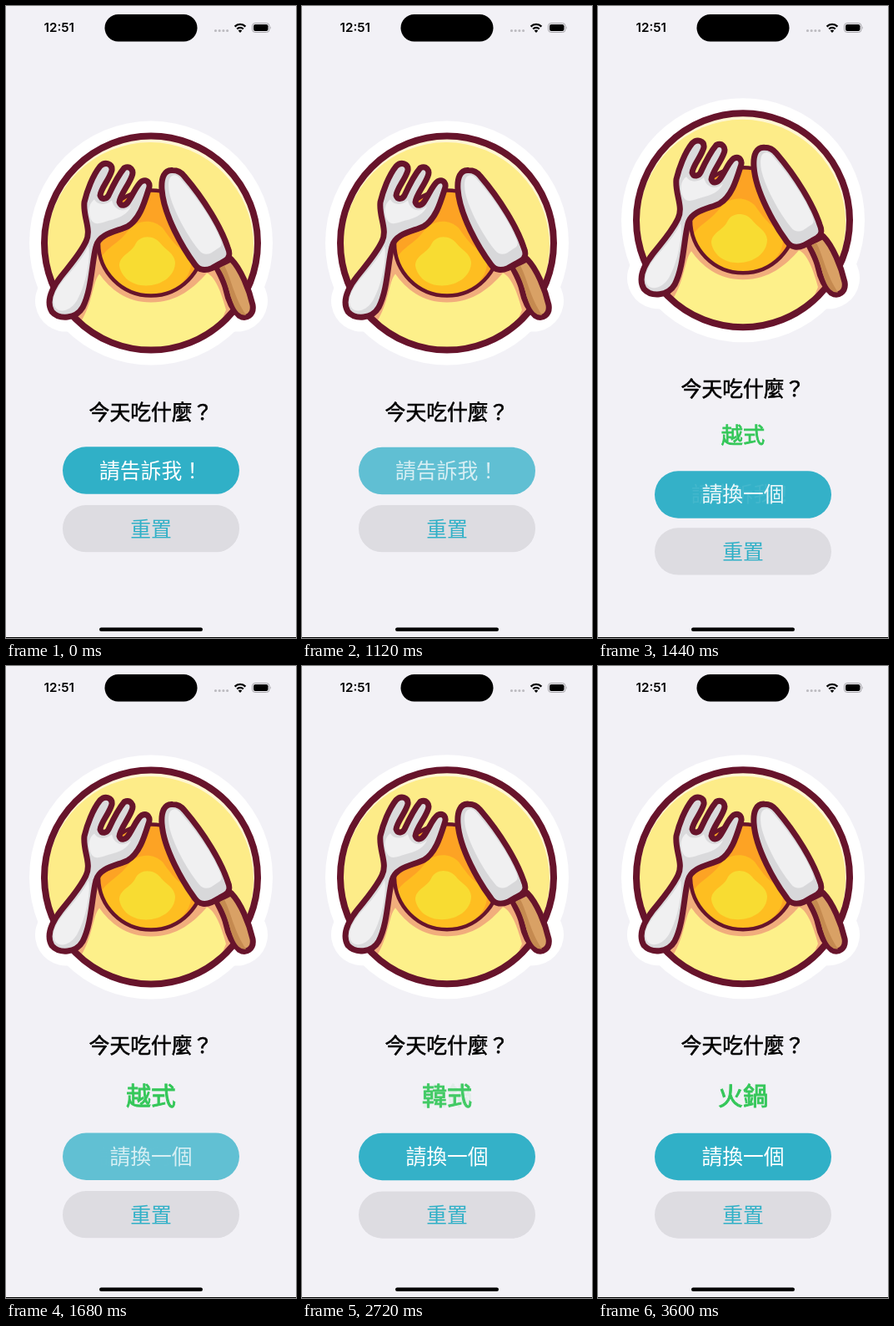
Animation of 348 by 756 pixels, one loop 4400 ms. Source, as an HTML page:

```html
<!DOCTYPE html>
<html lang="zh-TW">
<head>
<meta charset="utf-8">
<title>今天吃什麼？</title>
<style>
html, body { margin: 0; width: 100%; height: 100%; overflow: hidden; background: #f2f1f6; }
svg { display: block; }
text { font: 24.8px "Noto Sans CJK TC", "Noto Sans CJK", sans-serif; text-anchor: middle; }
.title { stroke: #000; stroke-width: .6; }
.food { font-size: 30.1px; fill: #34c759; stroke: #34c759; stroke-width: 1; }
.clock { font: 600 15.2px Inter, sans-serif; }
.line { stroke: #67142b; stroke-width: 7; stroke-linejoin: round; }
</style>
</head>
<body>
<svg width="348" height="756" viewBox="0 0 348 756">
  <clipPath id="plate"><circle cx="174" cy="284" r="127"/></clipPath>
  <clipPath id="yolk"><circle cx="174" cy="284" r="62"/></clipPath>

  <g id="status">
    <text class="clock" x="63.800" y="31.300">12:51</text>
    <rect x="118.5" y="10" width="111" height="32.5" rx="16.2"/>
    <path d="M251.5 29.5h15" stroke="#bcbbc0" stroke-width="3.2" stroke-linecap="round" stroke-dasharray="0 4.7"/>
    <path d="M274.6 24.6a9 9 0 0 1 12.8 0M277.2 27.5a5.4 5.4 0 0 1 7.6 0" fill="none" stroke="#000" stroke-width="2.3"/>
    <path d="M281 32l-2.3-2.4a3.2 3.2 0 0 1 4.6 0z"/>
    <rect x="295.5" y="20.5" width="20.5" height="11" rx="3.4" fill="none" stroke="#a4a3a8"/>
    <rect x="297" y="22" width="17.5" height="8" rx="2.2"/>
    <path d="M317.3 24.2q1.6 1.8 0 3.6z" fill="#a4a3a8"/>
  </g>

  <g id="top">
    <g transform="translate(0 -.4)">
      <g fill="#fff" stroke="#fff" stroke-width="74" stroke-linecap="round">
        <circle cx="174" cy="284" r="146" stroke="none"/>
        <path d="M72 353L110 300M277 353L240 300"/>
      </g>
      <circle cx="174" cy="284" r="128" fill="#fff6d2"/>
      <g clip-path="url(#plate)">
        <circle cx="173" cy="287.500" r="124" fill="#fdec88"/>
        <path d="M78 378C90 350 96 320 104 296H245C258 316 268 334 274 362L240 420H110Z" fill="#f1ad7c"/>
        <path d="M90 378C104 356 104 330 112 321C125 339 144 355 174 355C206 355 226 337 241 320C251 324 258 342 264 364L240 420H110Z" fill="#fdf08a"/>
      </g>
      <circle cx="174" cy="284" r="128" fill="none" stroke="#67142b" stroke-width="8"/>

      <circle cx="174" cy="284" r="63" fill="#fda324"/>
      <g clip-path="url(#yolk)">
        <path d="M112 306C118 290 134 286 146 270C156 256 176 254 188 266C198 280 204 288 214 294C228 304 222 324 206 336C180 354 120 346 112 306Z" fill="#febe21"/>
        <path d="M136 311C136 299 150 296 155 286C161 273 178 275 185 284C191 292 202 296 203 307C203 324 186 335 168 335C150 335 138 324 136 311Z" fill="#f8dc32"/>
      </g>
      <circle cx="174" cy="284" r="63" fill="none" stroke="#67142b" stroke-width="4.500"/>

      <path class="line" fill="#dadadc" d="M96 282C103 268 92 252 94 235C97 222 104 203 113 192C119 186 128 189 127 197C124 208 114 218 113 227C115 233 121 231 123 227C129 214 136 201 142 194C149 191 154 197 151 204C147 215 137 226 136 235C138 241 144 239 147 234C153 225 157 214 163 210C170 207 174 213 171 220C166 236 160 256 146 264C134 270 112 272 108 288C103 306 103 340 92 361C84 375 64 376 55 366C48 354 55 338 66 324C78 309 89 297 96 282Z"/>
      <g fill="#f0f0f1">
        <path d="M59 361C53 350 62 337 71 326C82 313 93 301 99 288C102 302 96 334 85 353C77 366 64 368 59 361Z"/>
        <path d="M102 256C97 246 100 236 106 232C111 240 121 238 127 233C130 246 142 248 150 240C146 250 136 254 124 257C114 260 107 264 102 256Z"/>
      </g>

      <path class="line" fill="#d9a165" d="M252 312L270 303C282 315 292 340 296 358C298 370 288 376 280 371C270 362 266 350 264 340C262 330 256 320 252 312Z"/>
      <path fill="#c58a50" d="M256 314L262 311C270 326 274 350 288 370Q283 371 279 367C268 354 270 336 256 314Z"/>
      <path class="line" fill="#d8d8da" d="M200 197C190 196 186 206 187 220C189 250 212 290 227 310C232 317 240 317 247 314L263 305C269 301 269 296 266 289C258 265 238 232 214 204C210 199 205 197 200 197Z"/>
      <path fill="#f0f0f1" d="M201 203C195 204 194 213 196 224C201 246 218 276 232 293C236 298 241 298 246 296L255 290C260 287 259 284 257 279C249 259 231 232 211 209C207 204 204 202 201 203Z"/>
    </g>
    <text class="title" x="174" y="494.500">今天吃什麼？</text>
  </g>

  <g id="foods">
    <text class="food" x="174" y="524.700"></text>
    <text class="food" x="174" y="524.700"></text>
  </g>

  <g id="pick" fill="#fff">
    <rect id="pill" x="68" y="527.300" width="212" height="56.500" rx="28.200" fill="#30b0c7"/>
    <text id="ask" x="174" y="564.500">請告訴我！</text>
    <text id="again" x="174" y="564.500">請換一個</text>
  </g>

  <g id="reset">
    <rect x="68" y="597" width="212" height="56.300" rx="28.100" fill="#dddce1"/>
    <text x="174" y="634.500" fill="#30b0c7">重置</text>
  </g>

  <rect x="112" y="743.500" width="124" height="4.500" rx="2.250"/>
  <rect y="755" width="348" height="1"/>
</svg>
<script>
const LOOP = 4400, STEP = 80, RISE = 31.4, LAYOUT_DELAY = 52, PRESSED = 0.75;
const taps = [
  { down: 1100, up: 1105, food: '越式' },
  { down: 1680, up: 1825, food: '火鍋' },
  { down: 2320, up: 2385, food: '韓式' },
  { down: 3030, up: 3035, food: '火鍋' },
];
const $ = id => document.getElementById(id);
const [oldFood, newFood] = $('foods').children;

// Critically damped spring with a 0.5 s response
function spring(ms) {
  const x = Math.max(0, ms) * 2 * Math.PI / 500;
  return 1 - (1 + x) * Math.exp(-x);
}
const shift = (id, y) => $(id).setAttribute('transform', `translate(0 ${y})`);
const fade = (el, a) => el.setAttribute('opacity', a);

function draw(t) {
  const first = taps[0].up;
  const swap = spring(t - first);
  const layout = spring(t - first - LAYOUT_DELAY);
  shift('top', -RISE * layout);
  shift('pick', RISE * swap);
  shift('reset', RISE * layout);
  $('foods').setAttribute('transform', `translate(174 514) scale(${layout}) translate(-174 -514)`);

  const press = taps.findLast(p => t >= p.down);
  const alpha = press ? PRESSED + (1 - PRESSED) * spring(t - press.up) : 1;
  fade($('pill'), alpha);
  fade($('ask'), alpha * (1 - swap));
  fade($('again'), alpha * swap);

  const i = taps.findLastIndex(p => t >= p.up);
  const mix = i > 0 ? spring(t - taps[i].up) : 1;
  oldFood.textContent = i > 0 ? taps[i - 1].food : '';
  newFood.textContent = i >= 0 ? taps[i].food : '';
  fade(oldFood, 1 - mix);
  fade(newFood, mix);
}

const start = performance.now();
function frame() {
  const t = (performance.now() - start) % LOOP;
  draw(Math.floor(t / STEP) * STEP);
  requestAnimationFrame(frame);
}
frame();
</script>
</body>
</html>
```
